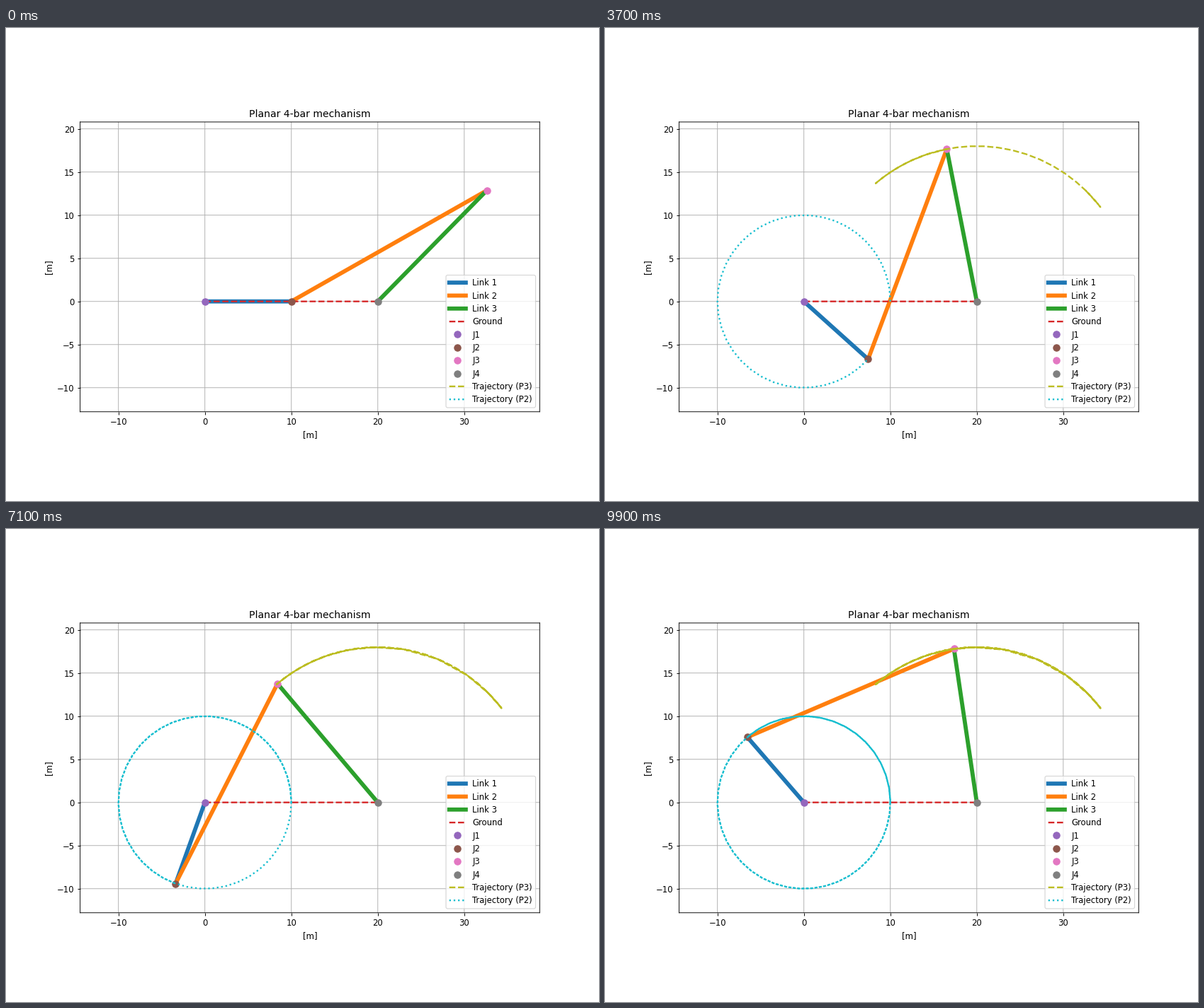
Recreate the animation shown at these times as a matplotlib script. Size 837 by 669 pixels, loop 10000 ms.

```python
import numpy as np
import matplotlib.pyplot as plt
from matplotlib.animation import FuncAnimation

DPI = 83.7
FRAMES, INTERVAL = 100, 100
CRANK, COUPLER, ROCKER, GROUND = 10, 26, 18, 20
STEP = 0.15  # crank rotation per frame, rad

plt.rcParams["path.snap"] = False  # keep sub-pixel line positions


def solve(theta):
    """Positions of the crank pin and the coupler-rocker joint."""
    p2 = CRANK * np.array([np.cos(theta), np.sin(theta)])
    dx, dy = GROUND - p2[0], -p2[1]
    d = np.hypot(dx, dy)
    along = (COUPLER**2 - ROCKER**2 + d**2) / (2 * d)
    across = np.sqrt(COUPLER**2 - along**2)
    p3 = p2 + np.array([along * dx - across * dy, along * dy + across * dx]) / d
    return p2, p3


def limits(values, margin=0.1):
    pad = margin * np.ptp(values)
    return values.min() - pad, values.max() + pad


P2, P3 = solve(STEP * np.arange(FRAMES))
J1, J4 = np.array([0, 0]), np.array([GROUND, 0])

fig, ax = plt.subplots(figsize=(837 / DPI, 669 / DPI), dpi=DPI)
ax.set_aspect("equal", adjustable="box")
ax.set_xlim(limits(np.hstack([P2[0], P3[0], [0, GROUND]])))
ax.set_ylim(limits(np.hstack([P2[1], P3[1], [0]])))
ax.set(title="Planar 4-bar mechanism", xlabel="[m]", ylabel="[m]")
ax.grid(True)


def add(label, style, **kw):
    return ax.plot([], [], style, label=label, **kw)[0]


links = [add(f"Link {k}", "-", lw=5) for k in (1, 2, 3)]
ground = add("Ground", "--", lw=2)
joints = [add(f"J{k}", "o", ms=8) for k in (1, 2, 3, 4)]
trace3 = add("Trajectory (P3)", "--", lw=2)
trace2 = add("Trajectory (P2)", ":", lw=2)
ground.set_data(*zip(J1, J4))
ax.legend(loc="lower right", labelspacing=0.46)


def update(i):
    pts = [J1, P2[:, i], P3[:, i], J4]
    for link, a, b in zip(links, pts, pts[1:]):
        link.set_data(*zip(a, b))
    for joint, p in zip(joints, pts):
        joint.set_data([p[0]], [p[1]])
    trace3.set_data(P3[:, :i + 1])
    trace2.set_data(P2[:, :i + 1])
    return [*links, *joints, trace3, trace2]


anim = FuncAnimation(fig, update, frames=FRAMES, interval=INTERVAL, repeat=True)
plt.show()
```
